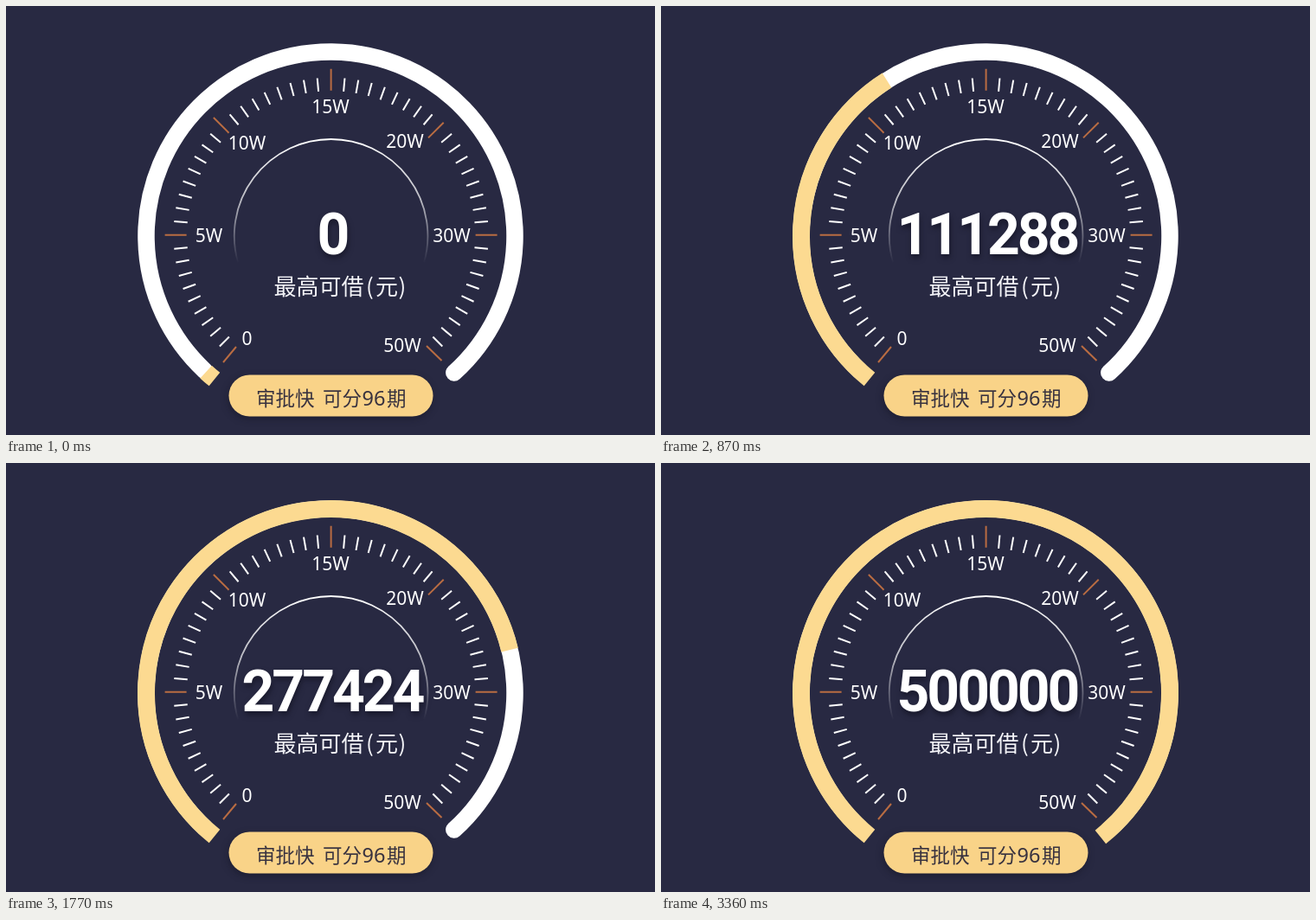
Write an HTML page that moves like this. It is 750x496 px and loops after 3600 ms.

```html
<!DOCTYPE html>
<html lang="zh-CN">
<head>
<meta charset="utf-8">
<title>额度仪表盘</title>
<style>
  html, body { margin: 0; width: 100%; height: 100%; overflow: hidden; background: #282942; }
  svg { display: block; width: 750px; height: 496px; }
  text { font-family: "Noto Sans CJK SC", "Noto Sans CJK", sans-serif; }
  .label { font: 400 21px "Noto Sans", sans-serif; fill: #fff; text-anchor: middle; }
  .caption { font-size: 26px; font-weight: 300; fill: #f4f4f8; }
  .offer { font-size: 22.5px; font-weight: 350; fill: #38323f; }
  .offer .num { font-family: "Noto Sans", sans-serif; font-size: 23.5px; }
  #amount {
    font: 700 66px Roboto, sans-serif; font-stretch: 90%;
    fill: #fff; text-anchor: middle;
    filter: drop-shadow(1px 4px 3px rgba(8, 8, 20, .5));
  }
  #pill { fill: #f9d388; filter: drop-shadow(-1px 3px 4px rgba(8, 8, 20, .35)); }
</style>
</head>
<body>
<svg viewBox="0 0 750 496">
  <defs>
    <linearGradient id="fade" gradientUnits="userSpaceOnUse" x1="0" y1="154" x2="0" y2="297">
      <stop offset="0" stop-color="#fff"/>
      <stop offset=".5" stop-color="#fff" stop-opacity=".68"/>
      <stop offset="1" stop-color="#fff" stop-opacity="0"/>
    </linearGradient>
  </defs>
  <g fill="none">
    <path id="track" stroke="#fff" stroke-width="19.5" stroke-linecap="round"/>
    <path id="progress" stroke="#fcda91" stroke-width="20"/>
    <path id="halo" stroke="url(#fade)" stroke-width="1.8"/>
    <path id="minor" stroke="#fff" stroke-width="2"/>
    <path id="major" stroke="#b96c42" stroke-width="2"/>
  </g>
  <g id="labels"></g>
  <text id="amount" y="287"></text>
  <text class="caption" y="334">
    <tspan x="309.5">最高可借</tspan><tspan x="416">(</tspan><tspan x="427">元</tspan><tspan x="453.5">)</tspan>
  </text>
  <rect id="pill" x="257.5" y="426.5" width="236" height="48" rx="24"/>
  <text class="offer" y="461.5">
    <tspan x="289">审批快</tspan><tspan x="366">可分</tspan><tspan class="num" x="411.5">96</tspan><tspan x="440">期</tspan>
  </text>
</svg>
<script>
  const LOOP = 3600, STEP = 30;
  const START = -141, END = 141.4;
  // [step, amount]; eased from one stop to the next
  const STOPS = [[0, 0], [13, 50000], [25, 100000], [38, 150000], [50, 200000], [63, 300000], [85, 500000]];
  const LABELS = [
    ['0', 278.5, 384], ['5W', 234.5, 265], ['10W', 278.5, 158], ['15W', 375, 116],
    ['20W', 461, 156], ['30W', 515, 265], ['50W', 458, 392]
  ];
  const $ = id => document.getElementById(id);

  // Angles are in degrees, clockwise from the top
  function polar(cx, cy, r, deg) {
    const a = deg * Math.PI / 180;
    return `${(cx + r * Math.sin(a)).toFixed(2)} ${(cy - r * Math.cos(a)).toFixed(2)}`;
  }
  function arc(cx, cy, r, from, to) {
    return `M${polar(cx, cy, r, from)}A${r} ${r} 0 ${to - from > 180 ? 1 : 0} 1 ${polar(cx, cy, r, to)}`;
  }
  const tick = (deg, r1, r2) => `M${polar(375.6, 264.8, r1, deg)}L${polar(375.6, 264.8, r2, deg)}`;

  function amountAt(step) {
    const i = STOPS.findIndex(([s]) => s > step);
    if (i < 0) return STOPS[STOPS.length - 1][1];
    const [s0, v0] = STOPS[i - 1], [s1, v1] = STOPS[i];
    const u = (step - s0) / (s1 - s0);
    return Math.round(v0 + (v1 - v0) * u * u * (3 - 2 * u));
  }

  function drawDial() {
    $('track').setAttribute('d', arc(375, 266, 213, -137, 137.9));
    $('halo').setAttribute('d', arc(375.6, 265.8, 111.8, -106, 106));

    let minor = '';
    for (let deg = -135; deg <= 135; deg += 5) {
      if (deg % 45 || Math.abs(deg) === 135) minor += tick(deg, 166.5, 182);
    }
    $('minor').setAttribute('d', minor);

    const major = [-90, -45, 0, 90].map(deg => tick(deg, 167, 192)).join('');
    $('major').setAttribute('d', major + tick(45, 159, 184) + 'M251 412L266 394M486 393L503.5 410');

    $('labels').innerHTML = LABELS.map(([label, x, y]) =>
      `<text class="label" x="${x}" y="${y + 7.5}">${label}</text>`).join('');
  }

  let shown = -1;
  function render(time) {
    const step = Math.floor(time % LOOP / STEP);
    if (step === shown) return;
    shown = step;
    const angle = Math.min(END, -137.5 + 3.626 * step);
    $('progress').setAttribute('d', arc(375, 266, 213, START, angle));

    const digits = String(amountAt(step));
    const xs = [...digits].map((_, i) => 378.5 + 34.8 * (i - (digits.length - 1) / 2));
    $('amount').setAttribute('x', xs.join(' '));
    $('amount').textContent = digits;
  }

  drawDial();
  const began = performance.now();
  function loop() {
    render(performance.now() - began);
    requestAnimationFrame(loop);
  }
  loop();
</script>
</body>
</html>
```
